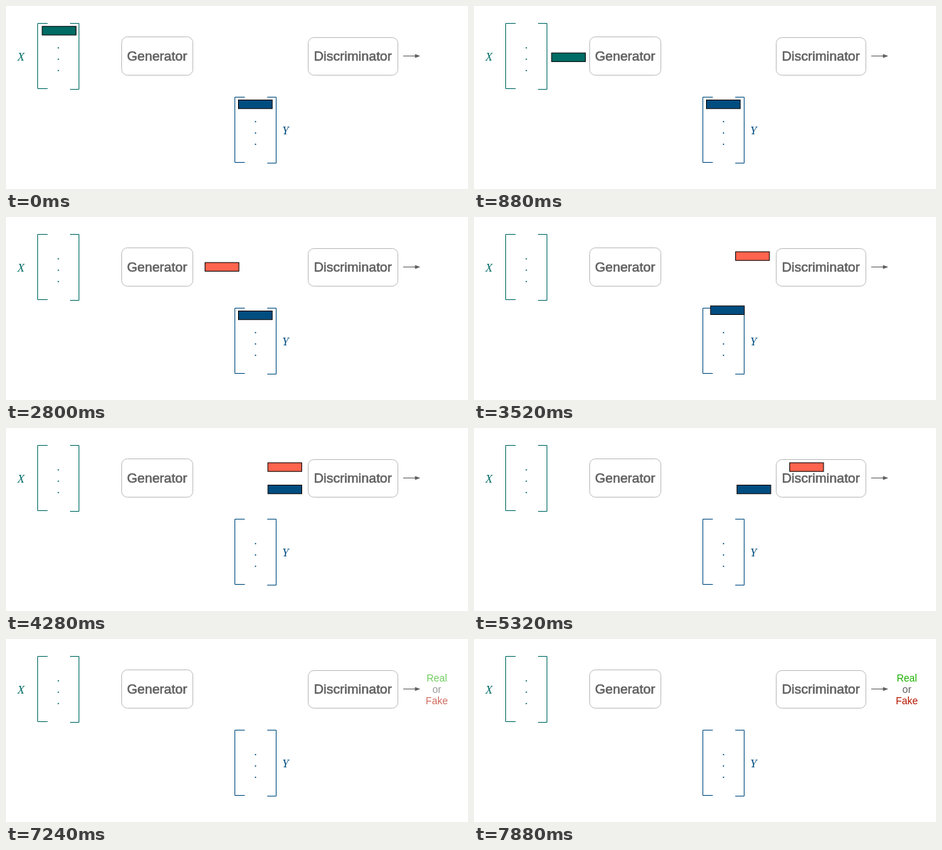
An HTML page that plays this animation: 649 by 258 pixels, repeating every 7.92 s.

```html
<!DOCTYPE html>
<html lang="en">
<head>
<meta charset="utf-8">
<title>Generator and discriminator</title>
<style>
  html, body { margin: 0; width: 100%; height: 100%; overflow: hidden; background: #fff; }
  svg { display: block; }
  text { font-family: "Liberation Sans", Arial, sans-serif; text-anchor: middle; }
  .title { font-size: 18.8px; fill: #5e5e5e; stroke: #5e5e5e; stroke-width: .55; }
  .name { font: italic 16.5px "Liberation Serif", "Times New Roman", serif; }
  .box { fill: none; stroke: #bcbcbc; }
  .chip { stroke: #000; }
  #verdict { font-size: 14px; }
</style>
</head>
<body>
<svg width="649" height="258" viewBox="0 0 649 258">
  <defs>
    <g id="matrix">
      <path d="M58.5 24.5h-14v92h14M90 24.5h12.5v93h-12.5" fill="none" stroke="currentColor"/>
      <path d="M73.5 59h.01M73.5 75h.01M73.5 91h.01" stroke="currentColor" stroke-width="1.9" stroke-linecap="round"/>
    </g>
  </defs>

  <use href="#matrix" color="#006c65"/>
  <use href="#matrix" x="277" y="104" color="#004d80"/>
  <text class="name" x="21" y="77" fill="#006c65">X</text>
  <text class="name" x="392.5" y="181" fill="#004d80">Y</text>

  <rect class="box" x="162.5" y="43.5" width="100" height="54" rx="8"/>
  <text class="title" x="212.2" y="77.3">Generator</text>
  <rect class="box" x="424.5" y="44.5" width="126" height="53" rx="8"/>
  <text class="title" x="487.3" y="77.3">Discriminator</text>
  <path d="M558 70.5h17" stroke="#5e5e5e"/>
  <path d="M574.5 67.8l7.5 2.7-7.5 2.7z" fill="#5e5e5e"/>

  <rect class="chip" id="input" x=".5" y=".5" width="47.5" height="12.2" fill="#006c65"/>
  <rect class="chip" id="fake" x=".5" y=".5" width="47.5" height="12.2" fill="#ff644e"/>
  <rect class="chip" id="real" x=".5" y=".5" width="47.5" height="12.2" fill="#004d80"/>

  <g id="verdict">
    <text x="607.5" y="59.8" fill="#1db100">Real</text>
    <text x="607.5" y="76.2" fill="#5e5e5e">or</text>
    <text x="607.5" y="92.4" fill="#b51700">Fake</text>
  </g>
</svg>
<script>
  const LOOP = 7920;
  const part = id => document.getElementById(id);
  const progress = (t, start, end) => Math.min(1, Math.max(0, (t - start) / (end - start)));
  const ease = u => (1 - Math.cos(Math.PI * u)) / 2;

  // Each move is [start, end, x, y]; fade and show are times in ms.
  const chips = [
    { el: part("input"), from: [50, 28], show: 0, fade: [1940, 2310],
      moves: [[-50, 940, 109, 66], [940, 1940, 184.5, 66]] },
    { el: part("fake"), from: [185, 80], show: 2290, fade: [6580, 6930],
      moves: [[2290, 3290, 367, 48.5], [4235, 5235, 443, 48.5]] },
    { el: part("real"), from: [326, 132], show: 0, fade: [6235, 6580],
      moves: [[3290, 4240, 367.5, 80], [5235, 6235, 443, 80]] }
  ];

  function place(el, x, y, opacity) {
    el.setAttribute("transform", `translate(${x.toFixed(2)} ${y.toFixed(2)})`);
    el.setAttribute("opacity", opacity.toFixed(3));
  }

  function drawChip({ el, from, show, fade, moves }, t) {
    let [x, y] = from;
    for (const [start, end, toX, toY] of moves) {
      const k = ease(progress(t, start, end));
      x += (toX - x) * k;
      y += (toY - y) * k;
    }
    place(el, x, y, t < show ? 0 : 1 - progress(t, ...fade));
  }

  // The verdict fades in from the left and springs into place.
  function drawVerdict(t) {
    const u = progress(t, 6930, 7930);
    const shift = -36 * Math.exp(-3.6 * u) * Math.cos(4.4 * u);
    place(part("verdict"), shift, 0, Math.min(1, u * 2));
  }

  function frame() {
    const t = performance.now() % LOOP;
    chips.forEach(chip => drawChip(chip, t));
    drawVerdict(t);
    requestAnimationFrame(frame);
  }
  frame();
</script>
</body>
</html>
```
